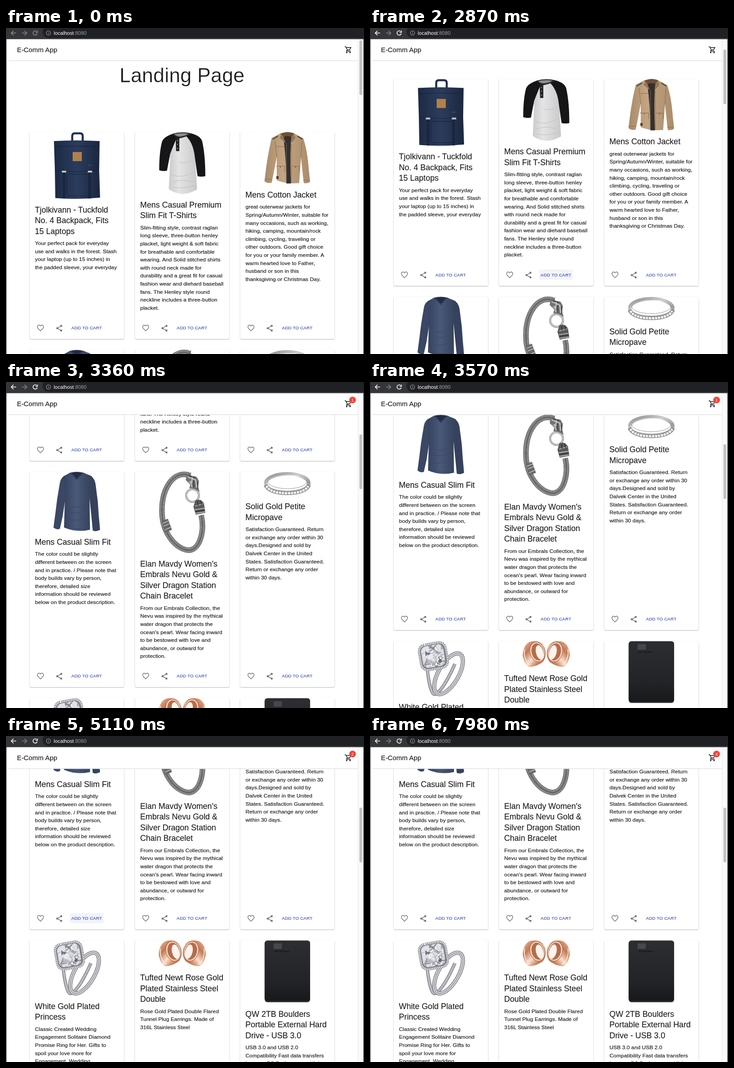
Write an HTML page that moves like this. It is 784x715 px and loops after 8000 ms.

```html
<!DOCTYPE html>
<html lang="en">
<head>
<meta charset="utf-8">
<title>E-Comm App</title>
<style>
html, body { margin: 0; width: 100%; height: 100%; overflow: hidden; background: #fff; }
svg { display: block; width: 784px; height: 715px; font-family: "Liberation Sans", Arial, sans-serif; }
text { fill: #1c1c1c; white-space: pre; }
.hero { font-size: 44px; letter-spacing: .2px; stroke: #fff; stroke-width: .4px; }
.brand { font-size: 14.67px; letter-spacing: .1px; stroke: #1c1c1c; stroke-width: .15px; }
.title { font-size: 17.6px; stroke: #1c1c1c; stroke-width: .12px; }
.body { font-size: 11.73px; letter-spacing: .11px; stroke: #1c1c1c; stroke-width: .2px; }
.action { font-size: 9.53px; letter-spacing: .27px; fill: #3f51b5; stroke: #3f51b5; stroke-width: .2px; }
.url { font-size: 11.15px; fill: #fff; }
.count { font-size: 8.8px; fill: #fff; text-anchor: middle; }
.card { fill: #fff; filter: drop-shadow(0 1px 1px rgba(0,0,0,.3)); }
.line { fill: none; stroke: currentColor; stroke-width: 2; }
</style>
</head>
<body>
<svg id="stage" viewBox="0 0 784 715">
  <defs>
    <linearGradient id="navy"><stop stop-color="#1c2a45"/><stop offset=".5" stop-color="#2b3c5c"/><stop offset="1" stop-color="#1b2740"/></linearGradient>
    <linearGradient id="blue"><stop stop-color="#35425f"/><stop offset=".45" stop-color="#4a5979"/><stop offset="1" stop-color="#334059"/></linearGradient>
    <linearGradient id="heather"><stop stop-color="#c6c6c8"/><stop offset=".4" stop-color="#e4e4e5"/><stop offset="1" stop-color="#c9c9cb"/></linearGradient>
    <linearGradient id="khaki"><stop stop-color="#a88a69"/><stop offset=".4" stop-color="#c3a584"/><stop offset="1" stop-color="#aa8c6b"/></linearGradient>
    <linearGradient id="silver" x2="1" y2="1"><stop stop-color="#8c8c90"/><stop offset=".4" stop-color="#efeff1"/><stop offset=".7" stop-color="#9b9ba0"/><stop offset="1" stop-color="#cfcfd3"/></linearGradient>
    <linearGradient id="rose" x2="1" y2="1"><stop stop-color="#f2bf9f"/><stop offset=".3" stop-color="#c27a57"/><stop offset=".55" stop-color="#fbe0cf"/><stop offset=".75" stop-color="#c98260"/><stop offset="1" stop-color="#a35c3c"/></linearGradient>
    <linearGradient id="black" x2="0" y2="1"><stop stop-color="#2d2e31"/><stop offset=".7" stop-color="#222326"/><stop offset="1" stop-color="#17181a"/></linearGradient>
    <clipPath id="press"><rect width="74" height="22.6" rx="3"/></clipPath>
    <clipPath id="cut"><rect x="10" y="9" width="49" height="48" rx="12"/></clipPath>
  </defs>
  <rect width="784" height="715" fill="#fff"/>
  <g id="page"></g>
  <g id="bar">
    <rect y="24" width="771" height="47" fill="#fff"/>
    <path d="M6 71.6H771" stroke="#dedede" stroke-width="1.2"/>
    <text class="brand" x="24" y="53">E-Comm App</text>
    <g transform="translate(741 39) scale(.733)" color="#1c1c1c">
      <path class="line" d="M1 3H4.3L8.6 12.2H15.6L19.6 5H5.2M8.6 12.2L6.4 16H19"/>
      <circle cx="7" cy="20" r="2"/><circle cx="17" cy="20" r="2"/>
    </g>
    <g id="badge"><circle r="7.3" fill="#f44336"/><text class="count" id="count" y="3.1"></text></g>
  </g>
  <rect x="770.5" y="24" width="11.5" height="691" fill="#fafafa"/>
  <path d="M771 24V715" stroke="#e6e6e6"/>
  <rect id="thumb" x="774" width="6" height="120" rx="3" fill="#c1c1c1"/>
  <path d="M.4 24V715M783.2 24V715" stroke="#323337" stroke-width="1.4"/>
  <rect width="784" height="24.5" fill="#35363a"/>
  <rect x="80" y="-5" width="760" height="27" rx="13.5" fill="#202124"/>
  <g id="nav" fill="none" stroke-width="1.6">
    <path d="M22 11H12M16.5 6L11.5 11L16.5 16"/>
    <path d="M67.3 7.7A4.7 4.7 0 1 0 68.4 12.2M68.8 5.8V9.8H64.8"/>
  </g>
  <path d="M35 11H45M40.5 6L45.5 11L40.5 16" fill="none" stroke="#808489" stroke-width="1.6"/>
  <circle cx="93" cy="11" r="4.7" fill="none" stroke="#9aa0a6" stroke-width="1.1"/>
  <path d="M93 10.3V13.6M93 8.2V9.3" stroke="#9aa0a6" stroke-width="1.2"/>
  <text class="url" x="104.5" y="15">localhost<tspan fill="#9aa0a6">:8080</tspan></text>
</svg>
<script>
const LOOP = 8000, STEP = 70;
const $ = id => document.getElementById(id);
const clamp = v => Math.max(0, Math.min(1, v));
const path = (d, fill, extra = '') => `<path d="${d}" fill="${fill}" ${extra}/>`;
const stroke = (d, color, width, extra = '') => path(d, 'none', `stroke="${color}" stroke-width="${width}" ${extra}`);
const ellipse = (x, y, rx, ry, extra) => `<ellipse cx="${x}" cy="${y}" rx="${rx}" ry="${ry}" ${extra}/>`;
const box = (x, y, w, h, fill, rx = 0) => `<rect x="${x}" y="${y}" width="${w}" height="${h}" rx="${rx}" fill="${fill}"/>`;
const lines = (cls, x, y, gap, list) =>
  list.map((s, i) => `<text class="${cls}" x="${x}" y="${y + i * gap}">${s.replace('&', '&amp;')}</text>`).join('');

let seed = 7;
const random = () => (seed = seed * 16807 % 2147483647) / 2147483647;

// Product pictures, each about 102 units wide
const backpack =
  stroke('M41 20V9Q41 3 47 3H58Q64 3 64 9V20', '#22314d', 4.5) +
  path('M1 20Q50 17 101 20L100 84L102 144Q50 149 4 145L3 84Z', 'url(#navy)') +
  stroke('M2 33Q50 29 100 33M3 84Q50 90 100 84', '#16213a', 1) +
  stroke('M29 93V137Q30 140 34 140H74Q77 140 77 136V93Z', '#17223a', 1.2) +
  stroke('M23 88V146M79 88V146', '#1a2640', 6) +
  box(18, 85, 10, 4, '#c3c4c4', 1.5) + box(75, 85, 10, 4, '#c3c4c4', 1.5) +
  stroke('M75 73H83', '#62605f', 1) + box(42, 44, 20, 20, '#b0814e');

const henley =
  path('M30 7Q51 14 72 6L84 16L80 60L84 126Q62 139 44 135Q30 132 22 125L25 60L18 18Z', 'url(#heather)') +
  path('M31 4Q10 11 7 22Q1 45 1 84Q9 87 18 85L25 48Q34 25 41 9Z', '#161618') +
  path('M70 3Q91 8 95 20Q102 50 102 97Q93 99 85 97L79 55Q76 25 60 9Z', '#161618') +
  path('M30 4Q50 -2 71 3Q66 10 45 14Q35 11 30 4Z', '#29292b') +
  path('M34 5Q48 1 65 4Q58 9 46 10Q39 10 34 5Z', '#8d8d90') +
  path('M37 10L45 11V42L38 42Z', '#202023') +
  stroke('M31 110Q50 102 76 110M29 94Q50 103 75 88M44 65Q58 72 75 62M30 121Q55 126 80 117', '#bfbfc2', 1) +
  [19, 27, 36].map(y => ellipse(41, y, 1, 1, 'fill="#ccc"')).join('');

const jacket =
  path('M36 3L17 13Q9 45 4 84L1 108Q8 114 17 111L28 55V106Q50 115 77 112L81 56L87 112Q96 114 101 109L98 82Q95 40 86 14L66 3Q51 0 36 3Z', 'url(#khaki)') +
  path('M42 9L61 9Q56 30 59 113H49Q49 60 42 9Z', '#33302f') +
  path('M36 4Q51 -3 66 3L63 13Q51 5 41 13Z', '#6c5038') +
  path('M38 5L34 13L48 25L42 10ZM65 4L69 13L58 26L60 11Z', '#987653') +
  stroke('M27 32H45M26 75H45V88M62 75H77V88M28 55L24 20M81 56L83 20M2 104H18M86 106H100M49 25V110M60 27V112', '#8b6a49', 1) +
  stroke('M19 16L31 9M73 9L84 16', '#51483f', 2.2) +
  box(27, 97, 5, 6, '#51402f') + ellipse(36, 77, 1, 1, 'fill="#493726"') + ellipse(69, 77, 1, 1, 'fill="#493726"');

const sweater =
  path('M28 7Q16 11 14 24L8 60L4 92L0 122Q7 128 14 125L20 98L26 58L31 24Z', '#3a4765') +
  path('M75 6Q89 10 92 26L97 65L99 94L102 127Q95 132 86 129L83 98L79 58L73 24Z', '#36425d') +
  path('M36 2L22 10L25 58L23 122Q50 134 80 127L79 58L84 10L66 2Q51 -2 36 2Z', 'url(#blue)') +
  path('M39 2Q51 -1 63 2L51 15Z', '#222d45') +
  stroke('M37 2L51 16.5L65 2', '#2e3a55', 1.6) +
  stroke('M25 58L24 30M79 58L80 30M30 86Q47 94 76 83M28 104Q48 110 76 99M38 76Q55 80 75 70M24 119Q50 129 79 122', '#3b4864', 1.2);

const cord = 'M66 7C31 -3 6 38 7 88C8 138 41 172 67 172C90 170 101 130 93 95';
const bracelet =
  stroke(cord, '#59595b', 12) + stroke(cord, '#b5b5b7', 10, 'stroke-dasharray="1.6 1.2"') +
  stroke(cord, '#77777a', 5, 'stroke-dasharray="1.2 1.6"') + stroke(cord, '#4c4c4e', 1) +
  ellipse(74, 52, 14, 14, 'fill="none" stroke="#77777a" stroke-width="4"') +
  ellipse(74, 52, 14, 14, 'fill="none" stroke="#e0e0e0" stroke-width="1.8"') +
  path('M61 6L71 1L70 8L83 11L88 20L86 34L90 44L78 38L67 36L69 28L59 18Z', '#737375') +
  stroke('M63 11L81 18L83 35M69 20L73 34M74 8L72 25', '#c9c9ca', 2.2) +
  stroke('M66 8L80 13M76 19L77 35M85 22L86 38', '#343436', 1.6) + ellipse(67, 23, 2, 1.6, 'fill="#c7a84d"') +
  path('M80 63Q90 57 99 69L102 90L81 94L76 77Z', '#59595b') +
  stroke('M80 75L98 70M79 83L100 80M81 91L101 88', '#b9b9bb', 1.8) +
  stroke('M85 64L86 74M92 62L94 72M80 87L101 84', '#2f2f31', 1.6) +
  path('M6 108L20 103L29 127L14 133Z', '#68686a') +
  stroke('M9 113L23 107M11 119L25 113M14 127L28 121', '#c4c4c6', 1.6);

const band =
  ellipse(51, 25.5, 47, 21, 'fill="none" stroke="url(#silver)" stroke-width="8"') +
  ellipse(51, 22, 48.5, 20, 'fill="none" stroke="#909095" stroke-width="1"') +
  stroke('M3 29Q12 47 51 47Q90 47 99 29', '#8a8a8e', 8) +
  stroke('M5 31Q14 47 51 47Q88 47 97 31', '#f2f2f4', 5, 'stroke-dasharray="5 1.5"') +
  ellipse(51, 21, 43, 16, 'fill="none" stroke="#77777c" stroke-width=".8"');

const shard = () => {
  const x = 8 + random() * 52, y = 8 + random() * 50, v = 95 + Math.round(random() * 160);
  const near = () => `${(x + random() * 20 - 10).toFixed(1)} ${(y + random() * 20 - 10).toFixed(1)}`;
  return path(`M${near()}L${near()}L${near()}Z`, `rgb(${v},${v},${v + 6})`);
};
const sideBand = 'M21 58C24 88 30 117 37 117C50 114 68 82 82 50';
const hoop = (width, color, dash = '') =>
  ellipse(68, 72, 22, 50, `transform="rotate(30 68 72)" fill="none" stroke="${color}" stroke-width="${width}" ${dash}`);
const fine = 'stroke-dasharray="1.6 1"';
const gem =
  stroke(sideBand, '#77787d', 7) + stroke(sideBand, '#e2e2e7', 4.5, fine) +
  hoop(9, '#6f7075') + hoop(6.5, '#d6d6dc') + hoop(2.6, '#8d8e94', fine) +
  '<g transform="rotate(-10 35 34)">' + box(3, 3, 64, 61, '#7c7d83', 17) +
  '<rect x="5.5" y="5.5" width="59" height="56" rx="15" fill="none" stroke="#e4e4e8" stroke-width="4.5" stroke-dasharray="2.4 1.4"/>' +
  box(10, 9, 49, 48, '#dfe2e8', 12) +
  `<g clip-path="url(#cut)">${Array.from({ length: 90 }, shard).join('')}</g>` +
  path('M34 20L48 34L35 48L21 34Z', '#f4f5f7', 'opacity=".6"') + '</g>';

const tunnel =
  path('M19 1Q40 -2 48 12Q54 34 44 46Q31 56 15 57Q3 53 0 30Q2 5 19 1Z', 'url(#rose)') +
  ellipse(32, 24, 16, 22, 'transform="rotate(-14 32 24)" fill="#f7d5c1" stroke="#a9613f" stroke-width="1"') +
  ellipse(32.5, 24, 13, 19, 'transform="rotate(-14 32.5 24)" fill="#b46d4c"') +
  ellipse(37, 25, 8, 16, 'transform="rotate(-14 37 25)" fill="#fdf3ec"') +
  stroke('M4 18Q1 43 17 53', '#fbe5d7', 2);
const plugs = tunnel + `<g transform="translate(103 0) scale(-1 1)">${tunnel}</g>`;

const drive =
  box(1.5, 1, 99.5, 135, '#3c3d40', 6) + box(1.5, .5, 99.5, 133, 'url(#black)', 6) +
  box(21, 7, 18, 12, '#45474b') +
  '<text x="22" y="26" style="font-size:5.6px;fill:#0d0d0e">QW Boulders</text>';

const rows = [
  { top: 228, bottom: 682, items: [
    [backpack, 147, ['Tjolkivann - Tuckfold', 'No. 4 Backpack, Fits', '15 Laptops'],
      ['Your perfect pack for everyday', 'use and walks in the forest. Stash', 'your laptop (up to 15 inches) in', 'the padded sleeve, your everyday']],
    [henley, 136, ['Mens Casual Premium', 'Slim Fit T-Shirts'],
      ['Slim-fitting style, contrast raglan', 'long sleeve, three-button henley', 'placket, light weight & soft fabric', 'for breathable and comfortable', 'wearing. And Solid stitched shirts', 'with round neck made for', 'durability and a great fit for casual', 'fashion wear and diehard baseball', 'fans. The Henley style round', 'neckline includes a three-button', 'placket.']],
    [jacket, 114, ['Mens Cotton Jacket'],
      ['great outerwear jackets for', 'Spring/Autumn/Winter, suitable for', 'many occasions, such as working,', 'hiking, camping, mountain/rock', 'climbing, cycling, traveling or', 'other outdoors. Good gift choice', 'for you or your family member. A', 'warm hearted love to Father,', 'husband or son in this', 'thanksgiving or Christmas Day.']]] },
  { top: 706, bottom: 1178, items: [
    [sweater, 130, ['Mens Casual Slim Fit'],
      ['The color could be slightly', 'different between on the screen', 'and in practice. / Please note that', 'body builds vary by person,', 'therefore, detailed size', 'information should be reviewed', 'below on the product description.']],
    [bracelet, 178, ["Elan Mavdy Women's", 'Embrals Nevu Gold &', 'Silver Dragon Station', 'Chain Bracelet'],
      ['From our Embrals Collection, the', 'Nevu was inspired by the mythical', 'water dragon that protects the', "ocean's pearl. Wear facing inward", 'to be bestowed with love and', 'abundance, or outward for', 'protection.']],
    [band, 52.5, ['Solid Gold Petite', 'Micropave'],
      ['Satisfaction Guaranteed. Return', 'or exchange any order within 30', 'days.Designed and sold by', 'Dalvek Center in the United', 'States. Satisfaction Guaranteed.', 'Return or exchange any order', 'within 30 days.']]] },
  { top: 1202, bottom: 1660, items: [
    [gem, 121, ['White Gold Plated', 'Princess'],
      ['Classic Created Wedding', 'Engagement Solitaire Diamond', 'Promise Ring for Her. Gifts to', 'spoil your love more for', 'Engagement, Wedding,']],
    [plugs, 58.5, ['Tufted Newt Rose Gold', 'Plated Stainless Steel', 'Double'],
      ['Rose Gold Plated Double Flared', 'Tunnel Plug Earrings. Made of', '316L Stainless Steel']],
    [drive, 138, ['QW 2TB Boulders', 'Portable External Hard', 'Drive - USB 3.0'],
      ['USB 3.0 and USB 2.0', 'Compatibility Fast data transfers', 'Improve PC Performance; High']]] }
];

const icons =
  `<g transform="translate(66.7 -32.4) scale(.733)" color="#757575">
    <path class="line" d="M12 20C5 14 3 11.5 3 8.5A4.6 4.6 0 0 1 12 6.2A4.6 4.6 0 0 1 21 8.5C21 11.5 19 14 12 20Z"/>
    <g transform="translate(56 0)" fill="#757575"><path class="line" d="M18 5L6 12L18 19"/>
      <circle cx="18" cy="5" r="3"/><circle cx="6" cy="12" r="3"/><circle cx="18" cy="19" r="3"/></g></g>`;

function card(row, r, [picture, height, title, body], c) {
  const first = row.top + height + 29.7, last = first + (title.length - 1) * 23.47;
  return `<g transform="translate(${c * 230.5} 0)">
    <rect class="card" x="52" y="${row.top}" width="206.5" height="${row.bottom - row.top}" rx="3"/>
    <g transform="translate(104 ${row.top})">${picture}</g>
    ${lines('title', 63.3, first, 23.47, title)}${lines('body', 63.5, last + 24.6, 17.6, body)}
    <g transform="translate(0 ${row.bottom})">${icons}
      <g transform="translate(139.7 -35.8)" clip-path="url(#press)" fill="#3f51b5">
        <rect id="hover${r}${c}" width="74" height="22.6" opacity="0"/>
        <circle id="ripple${r}${c}" cx="37" cy="11.3" r="0"/></g>
      <text class="action" x="143.3" y="-20.9">ADD TO CART</text></g></g>`;
}

$('page').innerHTML = '<text class="hero" x="248.5" y="119">Landing Page</text>' +
  rows.map((row, r) => row.items.map((item, c) => card(row, r, item, c)).join('')).join('');

// Pointer visits: button (row, column), enter, leave and click times
const visits = [
  { at: '01', enter: 2100, leave: 2700, click: 2310 },
  { at: '10', enter: 4150, leave: 5130, click: 4340 },
  { at: '11', enter: 5180, leave: 5260 },
  { at: '12', enter: 5480, leave: 6400, click: 5740 },
  { at: '10', enter: 6740, leave: 7620, click: 7070 }
];
const counts = [2940, 4970, 6300, 7700];

// Scroll knots: time, offset, speed
const knots = [[2660, 0, .2], [3150, 363, .78], [3570, 634, .58], [3850, 754, 0]];

function scrollAt(t) {
  if (t <= knots[0][0]) return 0;
  for (let i = 1; i < knots.length; i++) {
    const [t0, y0, v0] = knots[i - 1], [t1, y1, v1] = knots[i];
    if (t > t1) continue;
    const d = t1 - t0, u = (t - t0) / d, w = 1 - u;
    return w * w * (1 + 2 * u) * y0 + u * u * (3 - 2 * u) * y1 + u * w * d * (w * v0 - u * v1);
  }
  return knots[knots.length - 1][1];
}

function draw(t) {
  const y = scrollAt(t);
  $('page').setAttribute('transform', `translate(0 ${-y})`);
  $('thumb').setAttribute('y', 27 + y * .1728);
  $('nav').setAttribute('stroke', t < 1400 ? '#8d9094' : '#fff');

  const n = counts.filter(at => t >= at).length;
  const grow = 1 - (1 - clamp((t - counts[0]) / 225)) ** 3;
  $('badge').setAttribute('transform', `translate(759 39.5) scale(${grow})`);
  $('count').textContent = n || '';

  const shade = {}, wave = {};
  for (const { at, enter, leave, click } of visits) {
    shade[at] = (shade[at] || 0) + .07 * clamp((t - enter) / 250) * (1 - clamp((t - leave) / 250));
    const age = t - click;
    if (age >= 0 && age < 630) wave[at] = [45 * (1 - (1 - clamp(age / 500)) ** 2), .25 * (1 - clamp((age - 200) / 430))];
  }
  for (const at in shade) {
    const [radius, alpha] = wave[at] || [0, 0];
    $('hover' + at).setAttribute('opacity', shade[at]);
    $('ripple' + at).setAttribute('r', radius);
    $('ripple' + at).setAttribute('opacity', alpha);
  }
}

const start = performance.now();
function tick() {
  const t = (performance.now() - start) % LOOP;
  draw(Math.floor(t / STEP) * STEP);
  requestAnimationFrame(tick);
}
tick();
</script>
</body>
</html>
```
